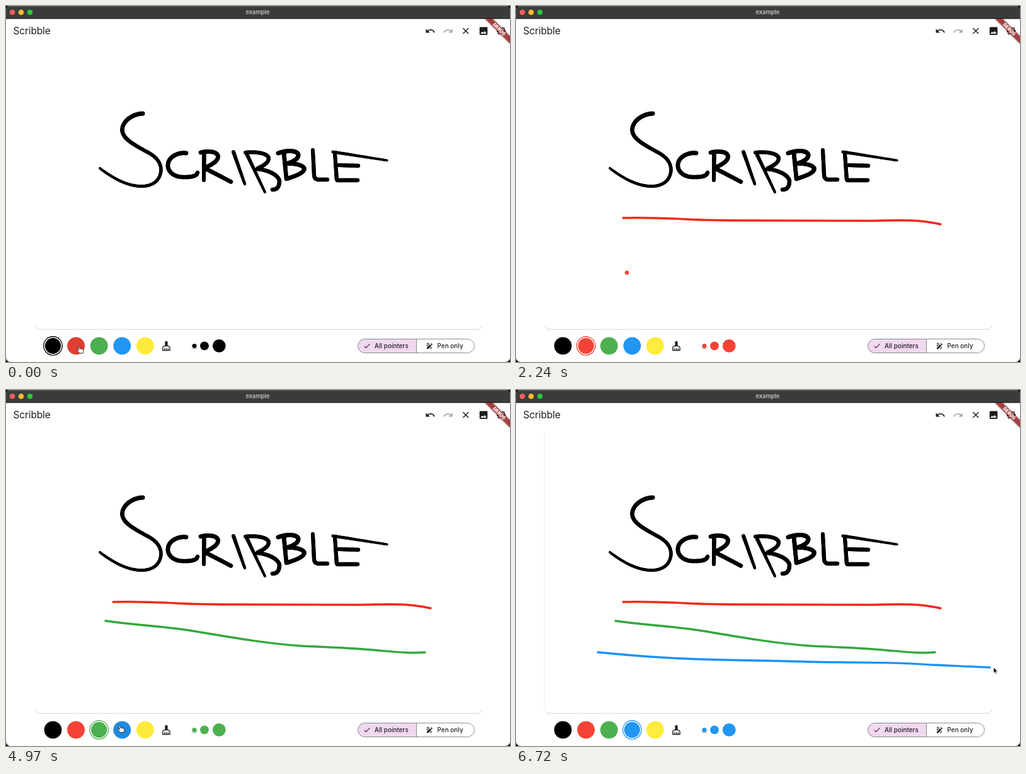
Animation, 800 px wide and 566 px high, one loop 6.79 s. Source, as an HTML page:

```html
<!DOCTYPE html>
<html lang="en">
<head>
<meta charset="utf-8">
<title>example</title>
<style>
  html, body { margin: 0; width: 100%; height: 100%; overflow: hidden; background: #000; }
  svg { display: block; width: 800px; height: 566px; font-family: Inter, Roboto, sans-serif; }
  .ink path { fill: none; stroke: #000; stroke-linecap: round; stroke-linejoin: round; }
  .line { fill: none; stroke-width: 3.4; stroke-linecap: round; stroke-linejoin: round; }
  .label { font-size: 9.8px; font-weight: 500; letter-spacing: .08px; fill: #1d1b20; }
</style>
</head>
<body>
<svg viewBox="0 0 800 566">
  <defs>
    <filter id="soft" x="-50%" y="-100%" width="200%" height="300%"><feGaussianBlur stdDeviation="1.8"/></filter>
    <clipPath id="page"><rect y="20" width="800" height="546"/></clipPath>
    <clipPath id="window"><rect width="800" height="566" rx="7"/></clipPath>
  </defs>
  <g clip-path="url(#window)">
  <rect width="800" height="566" fill="#fff"/>

  <g fill="none">
    <path d="M46 509q1.500 5.200 8 5.200H747q6.500 0 8-5.200" stroke="#d2d2d2"/>
    <path id="side" d="M45 70V506" stroke="#e9e9e9"/>
  </g>

  <rect width="800" height="20" fill="#3c3b3b"/>
  <rect width="800" height="1" fill="#6a6a6a"/>
  <rect y="19.400" width="800" height="1.100" fill="#0a0a0a"/>
  <g id="lights"></g>
  <text x="399.500" y="13.200" text-anchor="middle" font-size="9.200" font-weight="700" fill="#b5b4b4">example</text>
  <text x="11.500" y="45.200" font-size="15.400" letter-spacing="-.1" fill="#1d1b20">Scribble</text>

  <g id="icons"></g>

  <g clip-path="url(#page)">
    <g transform="translate(800 20) rotate(45)">
      <rect x="-28.200" y="19.700" width="56.400" height="8.500" fill="#000" opacity=".5" filter="url(#soft)"/>
      <rect x="-28.200" y="19.700" width="56.400" height="8.500" fill="#b71c1c" opacity=".63"/>
      <text y="26.500" text-anchor="middle" font-size="7.200" font-weight="900" fill="#fff">DEBUG</text>
    </g>
  </g>

  <g class="ink" id="ink"></g>
  <g id="lines"></g>
  <g id="palette"></g>
  <g id="sizes"></g>

  <path d="M651.500 529.500H569.500a11 11 0 0 0 0 22H651.500z" fill="#f0d8ef"/>
  <rect x="558.500" y="529.500" width="185" height="22" rx="11" fill="none" stroke="#817c84" stroke-width=".9"/>
  <path d="M651.500 529.500v22" stroke="#817c84" stroke-width=".9"/>
  <text class="label" x="585" y="543.900">All pointers</text>
  <text class="label" x="684.500" y="543.900">Pen only</text>
  <g id="toggleIcons"></g>

  <circle id="dot" r="3.300"/>
  <g id="hand" fill="#fff" stroke="#111" stroke-width=".9" stroke-linejoin="round">
    <path d="M-1 .8C-1-.4.9-.4 1.200.8L2.200 4.100C2.600 3.200 4 3.300 4.200 4.300 4.700 3.600 5.900 3.800 6.100 4.800 6.800 4.300 7.700 4.800 7.900 5.800 8.300 8 7.700 9 7 11H1.400C.6 9.300-1.500 8-2.300 6.700-2.900 5.700-1.500 5 .4 6.400z"/>
  </g>
  <path id="arrow" d="M0 0V9.300L2.200 7.300 3.700 10.500 5.200 9.800 3.800 6.700H6.700z" fill="#111" stroke="#fff" stroke-width=".7"/>
  </g>
</svg>

<script>
const LOOP = 6790, STEP = 70;
const $ = id => document.getElementById(id);

function add(parent, tag, attrs) {
  const el = document.createElementNS("http://www.w3.org/2000/svg", tag);
  for (const k in attrs) el.setAttribute(k, attrs[k]);
  return parent.appendChild(el);
}

function icon(parent, cx, cy, size, d, fill = "#1d1b20") {
  const at = `translate(${cx - size / 2} ${cy - size / 2}) scale(${size / 24})`;
  add(parent, "path", { d, fill, transform: at });
}

["#ff5f57", "#febc2e", "#28c840"].forEach((fill, i) =>
  add($("lights"), "circle", { cx: 10 + 14 * i, cy: 10, r: 4.3, fill }));

// Toolbar
icon($("icons"), 673.5, 39.7, 16.8, "M12.5 8c-2.65 0-5.05.99-6.9 2.6L2 7v9h9l-3.62-3.62c1.39-1.16 3.16-1.88 5.12-1.88 3.54 0 6.55 2.31 7.6 5.5l2.37-.78C21.08 11.03 17.15 8 12.5 8z");
icon($("icons"), 701.7, 39.7, 16.8, "M18.4 10.6C16.55 8.99 14.15 8 11.5 8c-4.65 0-8.58 3.03-9.96 7.22L3.9 16c1.05-3.19 4.05-5.5 7.6-5.5 1.95 0 3.73.72 5.12 1.88L13 16h9V7l-3.6 3.6z", "#aaa9aa");
icon($("icons"), 729.8, 39.7, 16.8, "M19 6.41L17.59 5 12 10.59 6.41 5 5 6.41 10.59 12 5 17.59 6.41 19 12 13.41 17.59 19 19 17.59 13.41 12z");
icon($("icons"), 758, 39.7, 16.8, "M21 19V5c0-1.1-.9-2-2-2H5c-1.1 0-2 .9-2 2v14c0 1.1.9 2 2 2h14c1.1 0 2-.9 2-2zM8.5 13.5l2.500 3.010L14.5 12l4.500 6H5l3.500-4.500z");
icon($("icons"), 786, 39.7, 16.8, "M4 7v2c0 .55-.45 1-1 1H2v4h1c.55 0 1 .45 1 1v2c0 1.65 1.35 3 3 3h3v-2H7c-.55 0-1-.45-1-1v-2c0-1.3-.84-2.42-2-2.83v-.34C5.16 11.42 6 10.3 6 9V7c0-.55.45-1 1-1h3V4H7C5.35 4 4 5.35 4 7zM21 10c-.55 0-1-.45-1-1V7c0-1.65-1.35-3-3-3h-3v2h3c.55 0 1 .45 1 1v2c0 1.3.84 2.42 2 2.83v.34c-1.16.41-2 1.52-2 2.83v2c0 .55-.45 1-1 1h-3v2h3c1.65 0 3-1.35 3-3v-2c0-.55.45-1 1-1h1v-4z");
icon($("icons"), 254.5, 540.6, 16.8, "M16 11h-1V3c0-1.1-.9-2-2-2h-2c-1.1 0-2 .9-2 2v8H8c-2.76 0-5 2.24-5 5v7h18v-7c0-2.76-2.24-5-5-5zm3 10h-2v-3c0-.55-.45-1-1-1s-1 .45-1 1v3h-2v-3c0-.55-.45-1-1-1s-1 .45-1 1v3H9v-3c0-.55-.45-1-1-1s-1 .45-1 1v3H5v-5c0-1.65 1.35-3 3-3h8c1.65 0 3 1.35 3 3v5z");
icon($("toggleIcons"), 573, 540.5, 12.7, "M9 16.17L4.83 12l-1.42 1.41L9 19 21 7l-1.41-1.41z");
icon($("toggleIcons"), 672.3, 540.5, 12.7, "M18.85 10.39l1.06-1.06c.78-.78.78-2.05 0-2.83L18.5 5.09c-.78-.78-2.05-.78-2.83 0l-1.06 1.06 4.24 4.24zm-5.66-2.83L4 16.76V21h4.24l9.19-9.19-4.24-4.25zM19 17.5c0 2.19-2.54 3.5-5 3.5-.55 0-1-.45-1-1s.45-1 1-1c1.54 0 3-.73 3-1.5 0-.47-.48-.87-1.23-1.2l1.48-1.48c1.07.63 1.75 1.47 1.75 2.68zM4.58 13.35C3.61 12.79 3 12.06 3 11c0-1.8 1.89-2.63 3.56-3.36C7.59 7.18 9 6.56 9 6c0-.41-.78-1-2-1-1.26 0-1.8.61-1.83.64-.35.41-.98.46-1.4.12-.41-.34-.49-.95-.15-1.38C3.73 4.24 4.76 3 7 3s4 1.32 4 3c0 1.87-1.93 2.72-3.64 3.47C6.42 9.88 5 10.5 5 11c0 .31.43.6 1.07.86l-1.49 1.49z");

// Handwriting: path, width at the start, width at the end
const letters = [
  ["M217 171C205 171 186 180 184.500 196C184 211 203 220 222 231C238 239 246 248 246 261C245 278 232 287 214 286.500C192 286 170 274 149 258", 7, 4],
  ["M286 234C275 232 258 239 257 252C256 264 268 273 284 272C296 272 303 270 304 265", 6.8, 6.5],
  ["M314.500 234L314 277", 6.5, 6],
  ["M309 233C320 230 336 231 336.500 239C337 247 325 253 315 257.500L357 279.500", 6.8, 6.5],
  ["M361 232L379 283", 6, 4.5],
  ["M382 235L411 296", 5.8, 4],
  ["M380 233C396 231 416 234 417 242C417 250 406 255 398 259C412 260 432 267 434 278C434 288 430 292 423 292", 6, 6.5],
  ["M441 233L445 274", 6.8, 6.5],
  ["M432 234C446 229 463 229 464 237C464 244 454 248 446 250.500C458 250 473 253 473.500 259C473 266 457 271 445 275", 7, 6.5],
  ["M487 229L489 268Q489 276 496 276L510 276", 6, 6.5],
  ["M522 234L525 277L558 277", 6, 6.5],
  ["M525 253L559 254", 6, 6.5],
  ["M519 232L605 245.5", 5, 3.5]
];

function taper([d, w0, w1]) {
  const path = add($("ink"), "path", { d });
  const len = path.getTotalLength(), n = Math.ceil(len / 3);
  const at = i => { const p = path.getPointAtLength(len * i / n); return `${p.x} ${p.y}`; };
  for (let i = 0; i < n; i++)
    add($("ink"), "path", { d: `M${at(i)}L${at(i + 1)}`, "stroke-width": w0 + (w1 - w0) * i / n });
  path.remove();
}
letters.forEach(taper);

// Palette
const colors = ["#000000", "#f44336", "#4caf50", "#2196f3", "#ffeb3b"];
const swatches = colors.map((fill, i) => {
  const x = 74.5 + 36.6 * i, pos = { cx: x, cy: 540.3 };
  return {
    x,
    ring: add($("palette"), "circle", { ...pos, r: 14.8, fill: "none", stroke: fill, "stroke-width": 1.3 }),
    disc: add($("palette"), "circle", { ...pos, fill }),
    shade: add($("palette"), "circle", { ...pos, fill: "#000", opacity: .08 })
  };
});
add($("sizes"), "circle", { cx: 299, cy: 542, r: 3.6, opacity: .35, filter: "url(#soft)" });
const sizes = [[299, 3.4], [315, 6.9], [338.3, 10.4]].map(([cx, r]) =>
  add($("sizes"), "circle", { cx, cy: 540.3, r }));

// Drawn lines: colour, start, end, path
const lines = [
  ["#ee2a1c", 1050, 1820, "M170 337C210 336 235 337 270 339S340 341 380 341L560 341.500C605 341 632 338 674 347"],
  ["#34a83c", 3500, 4340, "M158 367C195 373 245 375 290 382C350 392 410 403 470 407C530 410 550 410 590 414C625 417 645 419 665 417"],
  ["#1a93f8", 6090, 6650, "M130 417C175 421 220 426 290 428C350 430 400 430 460 432C540 434 600 432 660 437C690 438 720 440 752 441"]
].map(([stroke, from, to, d]) => {
  const el = add($("lines"), "path", { class: "line", stroke, d });
  return { el, from, to, len: el.getTotalLength() };
});

// Pointer track between the lines: time, x, y
const track = [
  [0, 115, 541], [350, 115, 541], [490, 150, 490], [600, 205, 405], [700, 228, 357], [840, 192, 342], [980, 170, 337], [1050, 170, 337],
  [1820, 674, 347], [1890, 655, 356], [2030, 420, 396], [2240, 176, 424], [2380, 152, 485], [2520, 146, 538], [2870, 146, 538],
  [3010, 172, 475], [3220, 196, 398], [3360, 165, 370], [3500, 158, 367],
  [4340, 665, 417], [4410, 650, 424], [4620, 400, 475], [4830, 205, 525], [4970, 180, 533.5], [5390, 180, 533.5],
  [5600, 162, 478], [5810, 140, 430], [6020, 132, 417], [6090, 130, 417],
  [6650, 752, 441], [6720, 758, 441], [6790, 758, 441]
];
const picks = [[0, 0], [210, 1], [2660, 2], [5180, 3]];

function pointerAt(t) {
  const i = track.findIndex(p => p[0] > t);
  const [a, b] = [track[i - 1], track[i]];
  const k = (t - a[0]) / (b[0] - a[0]);
  return { x: a[1] + (b[1] - a[1]) * k, y: a[2] + (b[2] - a[2]) * k };
}

const show = (el, on) => { el.style.display = on ? "" : "none"; };
const ease = k => k * k * (3 - 2 * k);

function render(t) {
  const picked = picks.filter(p => p[0] <= t).pop()[1];
  const { x, y } = pointerAt(t);

  let drawing = false;
  for (const { el, from, to, len } of lines) {
    const k = ease(Math.min(1, Math.max(0, (t - from) / (to - from))));
    drawing = drawing || (t >= from && t < to);
    show(el, t >= from);
    el.style.strokeDasharray = k < 1 ? `${Math.max(.1, len * k)} ${len + 9}` : "none";
  }

  let over = false;
  swatches.forEach((s, i) => {
    const hit = Math.hypot(x - s.x, y - 540.3) < 14;
    const r = i === picked ? 12.6 : 13.9;
    over = over || hit;
    show(s.ring, i === picked);
    show(s.shade, hit);
    s.disc.setAttribute("r", r);
    s.shade.setAttribute("r", r);
  });
  for (const s of sizes) s.setAttribute("fill", colors[picked]);

  const inCard = x > 45 && x < 756 && y < 514;
  const kinds = { dot: inCard && !drawing, hand: over, arrow: !inCard && !over };
  for (const id in kinds) {
    show($(id), kinds[id]);
    $(id).setAttribute("transform", `translate(${x} ${y})`);
  }
  $("dot").setAttribute("fill", colors[picked]);
  show($("side"), t >= 5250);
}

const start = performance.now();
function tick() {
  const t = (performance.now() - start) % LOOP;
  render(Math.floor(t / STEP) * STEP);
  requestAnimationFrame(tick);
}
tick();
</script>
</body>
</html>
```
